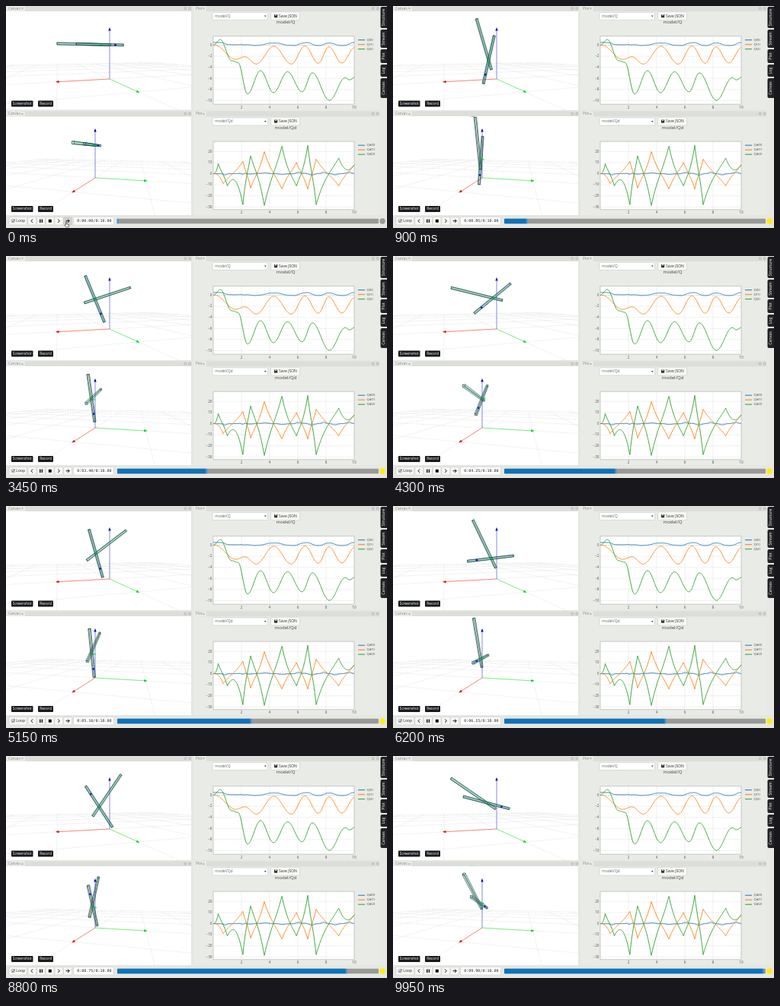
Animation, 500 px wide and 292 px high, one loop 10000 ms. Source, as an HTML page with a canvas:

```html
<!DOCTYPE html>
<html>
<head>
<meta charset="utf-8">
<style>
html, body { margin: 0; width: 100%; height: 100%; overflow: hidden; background: #e6e7e3; }
canvas { display: block; width: 500px; height: 292px; }
</style>
</head>
<body>
<canvas id="stage" width="500" height="292"></canvas>
<script>
const ctx = document.getElementById('stage').getContext('2d');
const SANS = '"Open Sans", "Noto Sans", sans-serif';
const MONO = '"DejaVu Sans Mono", monospace';
const BLUE = '#1f77b4', ORANGE = '#ff7f0e', GREEN = '#2ca02c';
const LOOP = 10, X0 = 272, PX_PER_S = 18.5;
const PANEL = '#e9ebe6';

// Turning points of each joint: [seconds, value].
const shoulder = [[0.1, 0], [1.6, -2.55], [2.25, -2.1], [3.05, -3.4], [4.3, -0.2], [5.54, -3.4],
  [6.5, -0.15], [7.45, -3.25], [8.2, -0.3], [9.12, -3.2], [10.05, -0.4]];
const elbow = [[0, 0], [0.5, 1], [1.3, -2.8], [1.75, -3.1], [2.43, -8.8], [3.35, -4.6], [4.27, -8.55],
  [5.27, -4.8], [6.3, -8.4], [7.03, -5], [8.24, -9.95], [9.37, -5.85], [9.65, -6.25], [10.2, -5.55]];
const shoulderSpikes = [[0, 0], [0.7, -9], [2.1, 11], [2.65, -13], [3.62, 20], [4.87, -14],
  [5.9, 10], [6.7, -14], [7.3, 13], [8.9, -11], [10, 8]];
const elbowSpikes = [[0, 0], [0.35, 9], [1, -11], [2.1, -28], [2.65, 16], [3.62, -29], [4.87, 25],
  [5.9, -11], [6.7, 25.5], [7.3, -28], [8.9, 14], [10, 8]];

function between(keys, t, mix) {
  let i = 0;
  while (i < keys.length - 2 && keys[i + 1][0] < t) i++;
  const [t0, a] = keys[i], [t1, b] = keys[i + 1];
  return mix(a, b, Math.min(1, Math.max(0, (t - t0) / (t1 - t0))));
}
const swing = (a, b, u) => a + (b - a) * (1 - Math.cos(Math.PI * u)) / 2;
const spike = (a, b, u) => a * (1 - u) ** 2.6 + b * u ** 2.6;

function pose(t) {
  const q1 = between(shoulder, t, swing), q2 = between(elbow, t, swing);
  // The slider balances the links' horizontal momentum.
  return { q0: 0.21 + 0.22 * Math.cos(q1) + 0.06 * Math.cos(q1 + q2), q1, q2 };
}
const sliderRate = t => (pose(t + 0.04).q0 - pose(t - 0.04).q0) / 0.08;

function rect(x, y, w, h, fill, stroke, r = 0) {
  ctx.beginPath();
  ctx.roundRect(x, y, w, h, r);
  if (fill) { ctx.fillStyle = fill; ctx.fill(); }
  if (stroke) { ctx.strokeStyle = stroke; ctx.lineWidth = 0.6; ctx.stroke(); }
}
function line(points, color, width = 1) {
  ctx.beginPath();
  points.forEach(([x, y]) => ctx.lineTo(x, y));
  ctx.strokeStyle = color;
  ctx.lineWidth = width;
  ctx.stroke();
}
function shape(points, color) {
  ctx.beginPath();
  points.forEach(([x, y]) => ctx.lineTo(x, y));
  ctx.closePath();
  ctx.fillStyle = color;
  ctx.fill();
}
function dot([x, y], r, color) {
  ctx.beginPath();
  ctx.arc(x, y, r, 0, Math.PI * 2);
  ctx.fillStyle = color;
  ctx.fill();
}
function label(str, x, y, size, color = '#444', align = 'left', font = SANS) {
  ctx.font = `${size}px ${font}`;
  ctx.textAlign = align;
  ctx.textBaseline = 'middle';
  ctx.fillStyle = color;
  ctx.fillText(str, x, y);
}
const range = (from, to, step) =>
  Array.from({ length: Math.round((to - from) / step) + 1 }, (_, i) => from + i * step);

function camera(ox, oy, horizon, scale, side, near) {
  const dist = 178 / scale, cx = 121.5;
  const depth = (x, y) => dist - near * x - side * y;
  const project = (x, y, z) => {
    const s = dist / depth(x, y);
    return [cx + s * (ox - cx + scale * (near * y - side * x)), horizon + s * (oy - horizon - scale * z)];
  };
  return { depth, project };
}
const views = [
  { top: 7, bottom: 136.5, cam: camera(136, 96, 65, 66, 0.957, 0.29) },
  { top: 145.5, bottom: 275, cam: camera(117, 226, 190, 63, 0.28, 0.96) }
];

function floor(cam) {
  const gridLine = at => line(
    range(-5, 5, 0.1).map(at).filter(([x, y]) => cam.depth(x, y) > 0.25)
      .map(([x, y]) => cam.project(x, y, 0)), '#dde3dc', 0.6);
  ctx.setLineDash([2, 1]);
  for (let k = -5; k <= 5; k++) {
    gridLine(s => [k, s]);
    gridLine(s => [s, k]);
  }
  ctx.setLineDash([]);
}
function axes(cam) {
  const origin = cam.project(0, 0, 0);
  [[1, 0, 0, '#ff6a60', '#e00000'], [0, 1, 0, '#5cee62', '#00d820'], [0, 0, 1, '#6a6ae0', '#0000d0']]
    .forEach(([x, y, z, color, tip]) => {
      const end = cam.project(x, y, z);
      line([origin, end], color, 0.8);
      const a = Math.atan2(end[1] - origin[1], end[0] - origin[0]);
      const at = (d, w) => [end[0] + d * Math.cos(a) - w * Math.sin(a), end[1] + d * Math.sin(a) + w * Math.cos(a)];
      shape([at(2, 0), at(-2.5, 1.7), at(-2.5, -1.7)], tip);
    });
}
function bar(cam, cx, cz, angle, y, half, fill) {
  const dx = -Math.cos(angle), dz = Math.sin(angle), w = 0.019, edge = '#17443f';
  const corner = (s, v, d) => cam.project(cx + s * dx - v * dz, y + d, cz + s * dz + v * dx);
  for (const d of [-w, w]) {
    const box = [corner(-half, -w, d), corner(half, -w, d), corner(half, w, d), corner(-half, w, d)];
    shape(box, fill);
    line([...box, box[0]], edge, 0.6);
  }
  for (const s of [-half, half]) for (const v of [-w, w])
    line([corner(s, v, -w), corner(s, v, w)], edge, 0.6);
}
function arm(cam, { q0, q1, q2 }) {
  const reach = 0.3, height = 0.68, a = q1 + q2;
  const jx = q0 - reach * Math.cos(q1), jz = height + reach * Math.sin(q1);
  bar(cam, q0, height, q1, 0, 0.51, 'rgba(110,200,165,.3)');
  bar(cam, jx, jz, a, 0.03, 0.475, 'rgba(90,175,175,.3)');
  const joint = cam.project(jx, 0.03, jz);
  const tip = cam.project(jx - 0.3 * Math.cos(a), 0.03, jz + 0.3 * Math.sin(a));
  line([joint, cam.project(jx, 0.1, jz)], '#00c040', 1);
  dot(joint, 1.2, '#00b83c');
  dot(tip, 1.4, '#0a1fc8');
}
function scene({ top, bottom, cam }, state) {
  ctx.save();
  ctx.beginPath();
  ctx.rect(0, top, 243, bottom - top);
  ctx.clip();
  ctx.fillStyle = '#fff';
  ctx.fillRect(0, top, 243, bottom - top);
  floor(cam);
  axes(cam);
  arm(cam, state);
  ctx.restore();
  const y = bottom - 12;
  [['Screenshot', 7, 28.5], ['Record', 42, 20]].forEach(([name, x, w]) => {
    rect(x, y, w, 8, '#17191b', null, 1);
    label(name, x + w / 2, y + 4, 4.8, '#fff', 'center');
  });
}

function paneHeader(x, y, name, width, right) {
  rect(x, y, right - x, 7, '#dcdeda');
  rect(x, y, width, 7, PANEL);
  label(name, x + 3, y + 3.7, 4.7, '#888');
  label('×', x + width - 5, y + 3.7, 5, '#777');
  for (const dx of [9.5, 3.5]) rect(right - dx, y + 2, 2.5, 2.5, null, '#aaa');
}

function plot(top, name, ticks, yOf, series) {
  rect(246, top, 244, 129.5, PANEL);
  rect(271, top + 1.5, 72.5, 10, '#fff', '#ccc', 1);
  label('model/' + name, 274, top + 6.4, 5, '#666');
  shape([[339, top + 5.5], [341.6, top + 5.5], [340.3, top + 7.5]], '#444');
  rect(347.5, top + 0.7, 38, 11, '#f8f8f6', '#ccc', 1.5);
  rect(352, top + 4, 4.2, 4.2, '#333', null, 0.5);
  rect(353.2, top + 4, 1.8, 1.5, '#eee');
  label('Save JSON', 358, top + 6.2, 5, '#333');
  label('model/' + name, 367, top + 14.7, 6.1, '#444', 'center');

  const y0 = top + 32.7, h = 89.5, xOf = t => X0 + t * PX_PER_S;
  rect(X0, y0, 185, h, '#fff', '#aaa');
  ctx.setLineDash([1.5, 1]);
  ticks.forEach(v => line([[X0, yOf(v)], [457, yOf(v)]], v ? '#d9d9d9' : '#aaa', 0.6));
  range(2, 8, 2).forEach(t => line([[xOf(t), y0], [xOf(t), y0 + h]], '#d5d5d5', 0.6));
  ctx.setLineDash([]);
  ticks.forEach(v => label(String(v).replace('-', '−'), 270.5, yOf(v), 4.6, '#555', 'right'));
  range(2, 10, 2).forEach(t => label(t, xOf(t), y0 + h + 4.3, 4.6, '#555', 'center'));

  series.forEach(([color, value], i) => {
    line(range(0, LOOP, 0.025).map(t => [xOf(t), yOf(value(t))]), color, 0.9);
    const y = y0 + 5 + i * 6;
    line([[462, y], [471, y]], color, 1);
    label(`${name}(${i})`, 473.5, y, 4.2, '#444');
  });
}

function sideTabs() {
  rect(490, 0, 10, 275, '#e8e9e5');
  [['Structure', 1, 28], ['Stream', 31, 24], ['Plot', 57, 18], ['Log', 77, 16], ['Canvas', 95, 26]]
    .forEach(([name, y, h]) => {
      rect(491.5, y, 11, h, '#202224', null, 2);
      ctx.save();
      ctx.translate(496, y + h / 2);
      ctx.rotate(-Math.PI / 2);
      label(name, 0, 0, 5.2, '#fff', 'center');
      ctx.restore();
    });
}

function toolbar(now, clock) {
  const ink = '#111', y = 282.7;
  rect(0, 275, 500, 17, '#e6e7e3');
  rect(4, 277.5, 23.5, 10.5, '#f7f7f5', '#ccc', 1);
  rect(7.3, 280.7, 4, 4, '#fff', '#777', 0.5);
  line([[8.2, 282.5], [9.2, 284], [11.2, 280.4]], '#222', 0.7);
  label('Loop', 13.3, y, 5, '#222');
  for (let i = 0; i < 5; i++)
    rect(28.8 + i * 11.7, 277.5, 11, 10.5, i === 4 && now < 0.3 ? '#d2d3d0' : '#f7f7f5', '#ccc', 1);
  const arrowHead = (x, dir) => line([[x - dir * 2, y - 2.2], [x, y], [x - dir * 2, y + 2.2]], ink, 1);
  arrowHead(33, -1);
  rect(44, y - 2.2, 1.5, 4.4, ink);
  rect(46.7, y - 2.2, 1.5, 4.4, ink);
  rect(55.8, y - 2, 4, 4, ink);
  arrowHead(70.3, 1);
  line([[78.6, y], [83, y]], ink, 1);
  arrowHead(83.2, 1);
  rect(88.5, 277.5, 53, 10.5, '#fff', '#ccc', 1);
  label(`0:${clock.toFixed(2).padStart(5, '0')}/0:10.00`, 93.3, 283, 5, '#222', 'left', MONO);

  const filled = 343 * clock / LOOP;
  rect(146, 279.7, 343, 6.5, '#999a98', null, 1);
  rect(146, 279.7, filled, 6.5, '#0e72b9', null, 1);
  rect(145.5 + filled, 279.7, 2, 6.5, '#3f91d0', null, 0.5);
  dot([494, 283], 3.7, now < 0.05 ? '#999' : '#ffee00');

  if (now < 0.3) {
    const hand = [[78.5, 284], [79.5, 284], [80, 287], [82.5, 287.6], [82.5, 290.5], [79, 291], [76.8, 288.3], [78.5, 288]];
    shape(hand, '#fff');
    line([...hand, hand[0]], '#222', 0.6);
  }
}

function drawStatic() {
  rect(0, 0, 500, 292, '#e6e7e3');
  for (const y of [0, 138.5]) {
    paneHeader(0, y, 'Canvas', 25, 243.5);
    paneHeader(246, y, 'Plot', 17, 490);
  }
  plot(7, 'Q', range(-10, 0, 2), v => 51.5 - 7.3 * v, [
    [BLUE, t => pose(t).q0],
    [ORANGE, t => pose(t).q1],
    [GREEN, t => pose(t).q2]
  ]);
  plot(145.5, 'Qd', range(-30, 20, 10), v => 220.5 - 1.46 * v, [
    [BLUE, sliderRate],
    [ORANGE, t => between(shoulderSpikes, t, spike)],
    [GREEN, t => between(elbowSpikes, t, spike)]
  ]);
  sideTabs();
}

const start = performance.now();
function frame() {
  const elapsed = (performance.now() - start) / 1000 % LOOP;
  const now = Math.floor(elapsed * 20) / 20;
  const clock = Math.max(0, now - 0.05);
  const state = pose(clock);
  views.forEach(view => scene(view, state));
  toolbar(now, clock);
  requestAnimationFrame(frame);
}
drawStatic();
frame();
</script>
</body>
</html>
```
